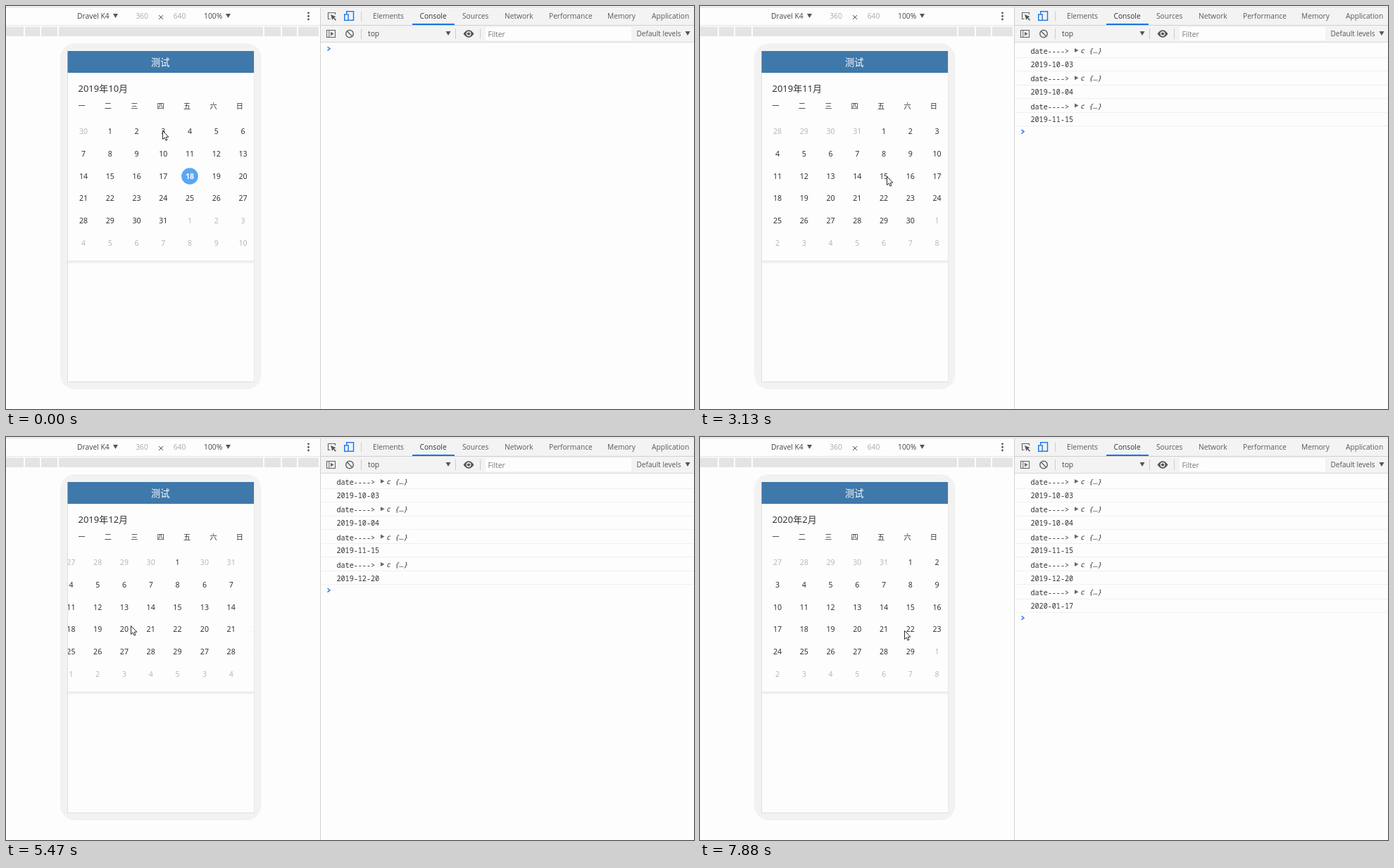
An HTML page with a canvas that plays this animation: 977x573 px, repeating every 8 s.

```html
<!DOCTYPE html>
<html lang="zh">
<head>
<meta charset="utf-8">
<title>Calendar</title>
<style>
  html, body { margin: 0; width: 100%; height: 100%; overflow: hidden; background: #fdfdfd; }
  canvas { display: block; width: 977px; height: 573px; }
</style>
</head>
<body>
<canvas id="stage"></canvas>
<script>
const W = 977, H = 573, LOOP = 8000;
const UI = '"Open Sans", "Noto Sans", sans-serif';
const CAL = '"Noto Sans", "Noto Sans CJK SC", "Noto Sans CJK", sans-serif';
const MONO = '"Noto Sans Mono", "Liberation Mono", monospace';

const canvas = document.getElementById('stage');
const ctx = canvas.getContext('2d');
const dpr = window.devicePixelRatio || 1;
canvas.width = W * dpr;
canvas.height = H * dpr;

// The screen refreshes in bursts: [first, last, count].
const bursts = [
  [280, 700, 4], [1100, 1100, 1], [1410, 2350, 8], [2500, 2860, 4], [3130, 4090, 8],
  [4250, 5200, 8], [5350, 6280, 8], [6400, 7340, 8], [7460, 7880, 4]
];
const ticks = [0];
for (const [a, b, n] of bursts)
  for (let i = 0; i < n; i++) ticks.push(n > 1 ? a + (b - a) * i / (n - 1) : a);

// Pointer path: time, x, y
const path = [
  [0, 222, 177], [280, 224, 177], [700, 261, 177], [1100, 261, 177], [1410, 262, 177],
  [1968, 165, 236], [2216, 190, 244], [2350, 224, 246], [2860, 265, 242], [3270, 265, 242],
  [3651, 168, 263], [3679, 172, 264], [4090, 222, 270], [4520, 270, 273], [5050, 270, 273],
  [5200, 258, 273], [5500, 172, 268], [5750, 200, 258], [6140, 262, 243], [6280, 262, 243],
  [6534, 311, 262], [6920, 214, 272], [7340, 315, 275], [7880, 290, 275]
];

// Swipes to the next month: press, release
const swipes = [[1410, 1968], [3270, 3651], [5050, 5500], [6534, 6920]];
const SETTLE = 400, PAGE = 265;

const logs = [
  [280, '2019-10-03'], [1100, '2019-10-04'], [3130, '2019-11-15'],
  [4650, '2019-12-20'], [6270, '2020-01-17']
];

function pointerAt(t) {
  const i = path.findIndex(k => k[0] > t);
  if (i < 0) return path[path.length - 1].slice(1);
  const [t0, x0, y0] = path[i - 1], [t1, x1, y1] = path[i];
  const p = (t - t0) / (t1 - t0);
  return [x0 + (x1 - x0) * p, y0 + (y1 - y0) * p];
}

// Scroll position of the month strip and the month named in the heading.
function stripAt(t) {
  let pos = 0, month = 0;
  for (const [press, release] of swipes) {
    if (t < press) break;
    const drag = pointerAt(press)[0] - pointerAt(Math.min(t, release))[0];
    if (t < release) { pos += drag; break; }
    const p = Math.min(1, (t - release) / SETTLE);
    pos += PAGE - (PAGE - drag) * (1 - p) ** 3;
    month++;
  }
  return { pos, month };
}

function rect(x, y, w, h, color) {
  ctx.fillStyle = color;
  ctx.fillRect(x, y, w, h);
}

function text(str, x, y, size, color, family = UI, align = 'left', style = '') {
  ctx.font = `${style} ${size}px ${family}`;
  ctx.textAlign = align;
  ctx.fillStyle = color;
  ctx.fillText(str, x, y + size * 0.36);
}

function poly(points, color) {
  ctx.beginPath();
  points.forEach(([x, y]) => ctx.lineTo(x, y));
  ctx.closePath();
  ctx.fillStyle = color;
  ctx.fill();
}

function line(points, color, width = 1) {
  ctx.beginPath();
  points.forEach(([x, y], i) => i ? ctx.lineTo(x, y) : ctx.moveTo(x, y));
  ctx.strokeStyle = color;
  ctx.lineWidth = width;
  ctx.stroke();
}

function circle(x, y, r, color, width) {
  ctx.beginPath();
  ctx.arc(x, y, r, 0, Math.PI * 2);
  if (width) {
    ctx.strokeStyle = color;
    ctx.lineWidth = width;
    ctx.stroke();
  } else {
    ctx.fillStyle = color;
    ctx.fill();
  }
}

function box(x, y, w, h, color, width) {
  ctx.strokeStyle = color;
  ctx.lineWidth = width;
  ctx.strokeRect(x, y, w, h);
}

function arrowDown(x, y, color = '#555') {
  poly([[x - 3.5, y - 3], [x + 3.5, y - 3], [x, y + 3]], color);
}

function drawDeviceBar() {
  text('Dravel K4', 101, 14.5, 10.3, '#444');
  arrowDown(155.5, 14);
  text('360', 193, 14.5, 10.3, '#aaa', UI, 'center');
  line([[217, 13], [223, 19]], '#555');
  line([[223, 13], [217, 19]], '#555');
  text('640', 246.5, 14.5, 10.3, '#aaa', UI, 'center');
  text('100%', 281, 14.5, 10.3, '#444');
  arrowDown(315.5, 14);
  [9.8, 14.4, 19].forEach(y => circle(429.5, y, 1.4, '#555'));
  rect(0, 27, 446, 1, '#e6e6e6');
  const edges = [0, 26, 49, 74, 366, 391, 414, 445];
  for (let i = 0; i < 7; i++) {
    const x = edges[i] + (i ? 1 : 0);
    rect(x, 29.5, edges[i + 1] - 1 - x, 13.5, '#e4e4e4');
  }
}

function drawTools() {
  rect(447, 2, 530, 49, '#f3f3f3');
  rect(447, 27, 530, 1, '#d0d0d0');
  rect(447, 51, 530, 1, '#d8d8d8');
  rect(446, 2, 1, 571, '#d0d0d0');
  rect(0, 1, W, 1, '#d8d8d8');

  // element picker and device toggle
  line([[460.5, 18.5], [457.5, 18.5], [457.5, 9.5], [467.5, 9.5], [467.5, 12]], '#666', 1.2);
  poly([[461, 12], [468.5, 15.2], [465.8, 16.4], [469, 19.6], [467.8, 20.8], [464.8, 17.6], [463.4, 20]], '#555');
  box(483.7, 7.7, 9.8, 12.6, '#1a73e8', 1.4);
  rect(479.5, 11, 7.5, 10.5, '#f3f3f3');
  box(480.7, 12, 5.4, 8.4, '#1a73e8', 1.4);

  const tabs = [['Elements', 521], ['Console', 587.5], ['Sources', 648], ['Network', 708],
    ['Performance', 771], ['Memory', 854], ['Application', 917]];
  tabs.forEach(([name, x]) => text(name, x, 14.5, 10.2, name === 'Console' ? '#333' : '#5a5a5a'));
  rect(577, 25, 60, 2, '#1a73e8');

  // console toolbar
  box(455.5, 34.5, 12, 10, '#666', 1.1);
  line([[458.8, 34.5], [458.8, 44.5]], '#666');
  poly([[461, 36.7], [465.6, 39.5], [461, 42.3]], '#666');
  circle(488, 39.5, 5.3, '#666', 1.5);
  line([[484.3, 35.8], [491.7, 43.2]], '#666', 1.5);
  text('top', 514, 39.5, 10.3, '#444');
  arrowDown(628, 39);
  ctx.beginPath();
  ctx.moveTo(649.5, 39.5);
  ctx.quadraticCurveTo(657, 28.8, 664.5, 39.5);
  ctx.quadraticCurveTo(657, 50.2, 649.5, 39.5);
  ctx.fillStyle = '#555';
  ctx.fill();
  circle(657, 39.5, 3.4, '#f3f3f3');
  circle(657, 39.5, 2.1, '#555');
  rect(681, 30, 207, 19, '#fdfdfd');
  text('Filter', 684.5, 40, 10.3, '#777');
  text('Default levels', 895.5, 39.5, 10.1, '#555');
  arrowDown(968, 39);
  rect(504, 8, 1, 13, '#ccc');
  [504, 638, 673].forEach(x => rect(x, 32, 1, 15, '#ccc'));
}

function drawConsole(t) {
  const shown = logs.filter(l => l[0] <= t);
  shown.forEach(([, date], i) => {
    const y = i * 39.3;
    text('date---->', 469.5, 64.3 + y, 10.1, '#333', MONO);
    poly([[532, 60 + y], [537.5, 63 + y], [532, 66 + y]], '#666');
    text('c {…}', 540, 63.3 + y, 10.1, '#333', MONO, 'left', 'italic');
    text(date, 469.5, 83 + y, 10.1, '#333', MONO);
    rect(448, Math.round(72.5 + y), 529, 1, '#f0f0f0');
    rect(448, Math.round(91.5 + y), 529, 1, '#f0f0f0');
  });
  const y = 60.7 + shown.length * 39.3;
  line([[456.5, y - 2.7], [460, y], [456.5, y + 2.7]], '#367cf1', 1.5);
}

function drawMonth(index, shift) {
  const first = new Date(2019, 9 + index, 1);
  const lead = (first.getDay() + 6) % 7;
  for (let i = 0; i < 42; i++) {
    const day = new Date(2019, 9 + index, 1 - lead + i);
    const x = 110 + (i % 7) * 37.75 + shift;
    const y = 178.3 + Math.floor(i / 7) * 31.7;
    const inside = day.getMonth() === first.getMonth();
    const today = index === 0 && inside && day.getDate() === 18;
    if (today) circle(x, y + 0.3, 11.8, '#59a7f3');
    const color = today ? '#fff' : inside ? '#333' : '#b8b8b8';
    text(day.getDate(), x, y, 10.6, color, CAL, 'center', today ? 'bold' : '');
  }
}

function drawPhone(t) {
  ctx.beginPath();
  ctx.roundRect(77, 53, 285.5, 492, 21);
  ctx.fillStyle = '#f2f2f2';
  ctx.fill();
  rect(87, 64, 265.5, 471, '#dedede');
  rect(88, 64, 264, 470, '#fdfdfd');
  rect(87.5, 64, 264.5, 31, '#3f78aa');
  text('测试', 219.3, 80, 13.2, '#fff', CAL, 'center');

  const { pos, month } = stripAt(t);
  const shown = new Date(2019, 9 + month, 1);
  text(`${shown.getFullYear()}年${shown.getMonth() + 1}月`, 102.5, 117, 13, '#333', CAL);
  [...'一二三四五六日'].forEach((d, i) =>
    text(d, 107.5 + i * 37.4, 142.5, 10.2, '#333', CAL, 'center'));

  ctx.save();
  ctx.beginPath();
  ctx.rect(88, 155, 264, 205);
  ctx.clip();
  const page = Math.floor(pos / PAGE);
  drawMonth(page, page * PAGE - pos);
  drawMonth(page + 1, (page + 1) * PAGE - pos);
  ctx.restore();

  const fade = ctx.createLinearGradient(0, 362, 0, 367);
  fade.addColorStop(0, '#e6e6e6');
  fade.addColorStop(1, '#fdfdfd');
  rect(88, 362, 264, 5, fade);
}

function drawPointer(t) {
  const [x, y] = pointerAt(t).map(Math.round);
  const shape = [[0, 0], [0, 12], [2.7, 9.6], [4.5, 13.7], [6.4, 12.9], [4.7, 8.9], [8.3, 8.7]];
  poly(shape.map(([dx, dy]) => [x + 0.5 + dx, y + 0.5 + dy]), '#fff');
  ctx.strokeStyle = '#222';
  ctx.lineWidth = 0.95;
  ctx.stroke();
}

function draw(now) {
  const t = now % LOOP;
  const held = ticks.filter(s => s <= t + 15).pop();
  ctx.setTransform(dpr, 0, 0, dpr, 0, 0);
  rect(0, 0, W, H, '#fdfdfd');
  drawDeviceBar();
  drawTools();
  drawConsole(held);
  drawPhone(held);
  drawPointer(held);
}

const start = performance.now();
function loop() {
  draw(performance.now() - start);
  requestAnimationFrame(loop);
}
loop();
</script>
</body>
</html>
```
